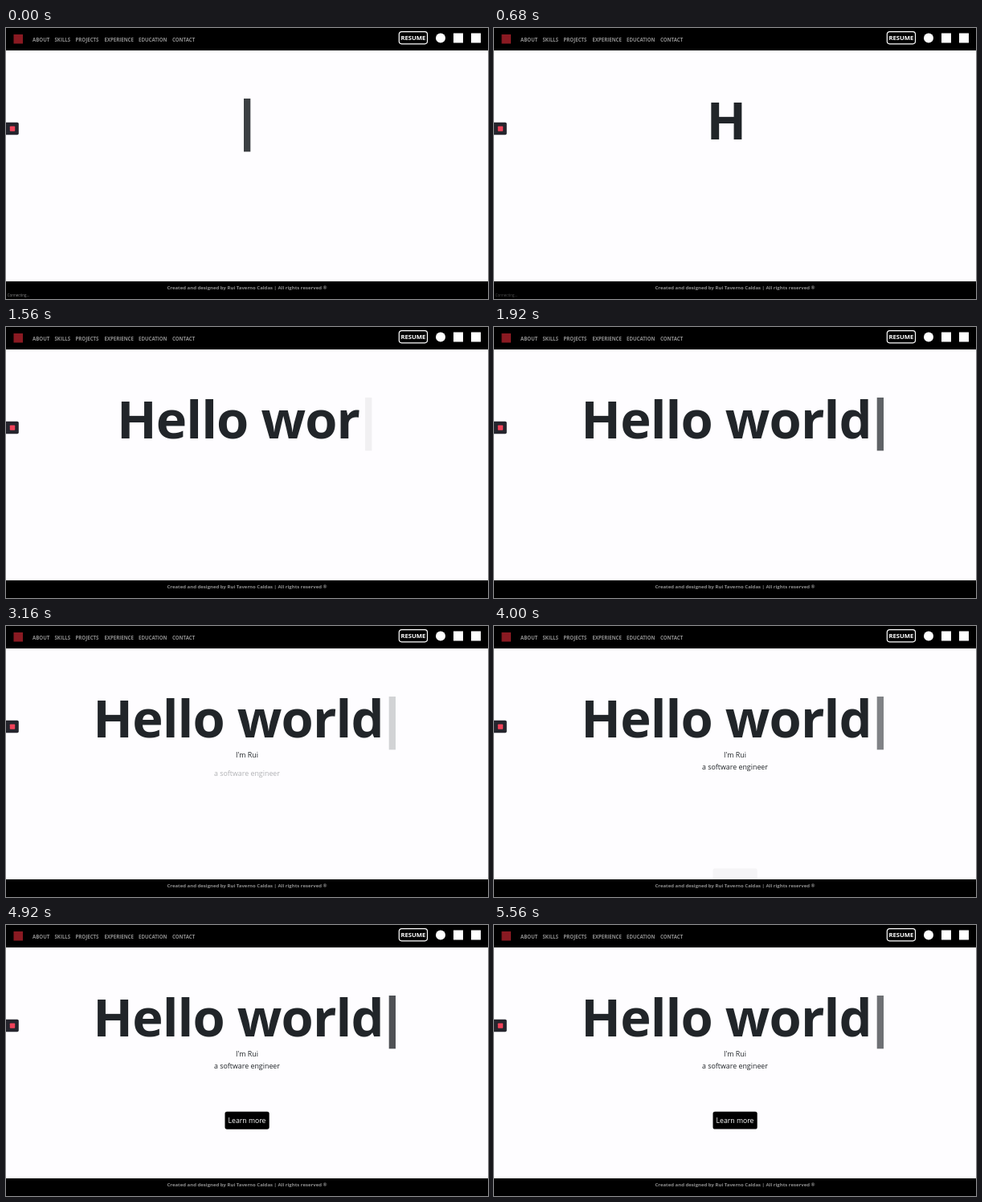
Write an HTML page with a canvas that moves like this. It is 600x338 px and loops after 5.6 s.

```html
<!DOCTYPE html>
<html lang="en">
<head>
<meta charset="utf-8">
<title>Portfolio intro</title>
<style>
  html, body { margin: 0; width: 100%; height: 100%; overflow: hidden; background: #fefdff; }
  canvas { display: block; width: 600px; height: 338px; }
</style>
</head>
<body>
<canvas id="stage"></canvas>
<script>
const W = 600, H = 338, LOOP = 5600;
const PAPER = '#fefdff', INK = '#212529', MUTED = '#8e8e8e';
const FAMILY = '"Open Sans", "Noto Sans", sans-serif';
const TITLE = 'Hello world', TYPE_START = 600, TYPE_STEP = 120;

const NAV = [['ABOUT', 33], ['SKILLS', 60.5], ['PROJECTS', 86.5],
  ['EXPERIENCE', 122.5], ['EDUCATION', 165], ['CONTACT', 207]];

// Page clock in seconds against loop time, with a short stall and a skip
const CLOCK = [[0, .29], [1920, 2.21], [2360, 2.65], [2479, 2.65], [2480, 3.07],
  [3160, 3.75], [4000, 4.63], [4400, 5.085], [5600, 6.225]];

const canvas = document.getElementById('stage');
const ctx = canvas.getContext('2d');
const ratio = window.devicePixelRatio || 1;
canvas.width = W * ratio;
canvas.height = H * ratio;

const clamp = v => Math.min(1, Math.max(0, v));

function clock(t) {
  let i = 1;
  while (i < CLOCK.length - 1 && t >= CLOCK[i][0]) i++;
  const [t0, a] = CLOCK[i - 1], [t1, b] = CLOCK[i];
  return a + (b - a) * (t - t0) / (t1 - t0);
}

// cubic-bezier(.25, .1, .25, 1)
function ease(x) {
  x = clamp(x);
  if (x === 0 || x === 1) return x;
  const curve = (s, p, q) => 3 * s * (1 - s) * ((1 - s) * p + s * q) + s * s * s;
  let lo = 0, hi = 1;
  for (let i = 0; i < 24; i++) {
    const mid = (lo + hi) / 2;
    if (curve(mid, .25, .25) < x) lo = mid; else hi = mid;
  }
  return curve(lo, .1, 1);
}

function blink(seconds) {
  const u = seconds % 1;
  return u < .5 ? ease(u * 2) : 1 - ease(u * 2 - 1);
}

function text(str, x, y, size, color, weight = 400, align = 'left') {
  ctx.font = `${weight} ${size}px ${FAMILY}`;
  ctx.textAlign = align;
  ctx.fillStyle = color;
  ctx.fillText(str, x, y);
}

function rect(x, y, w, h, color) {
  ctx.fillStyle = color;
  ctx.fillRect(x, y, w, h);
}

function rounded(x, y, w, h, r) {
  ctx.beginPath();
  ctx.roundRect(x, y, w, h, r);
}

function fillRounded(x, y, w, h, r, color) {
  rounded(x, y, w, h, r);
  ctx.fillStyle = color;
  ctx.fill();
}

function fadeUp(progress, distance, paint) {
  if (progress <= 0) return;
  const e = ease(progress);
  ctx.save();
  ctx.globalAlpha = e;
  ctx.translate(0, distance * (1 - e));
  paint();
  ctx.restore();
}

function drawTitle(t) {
  const count = t < TYPE_START ? 0 : Math.floor((t - TYPE_START) / TYPE_STEP) + 1;
  const typed = TITLE.slice(0, count);
  ctx.save();
  ctx.letterSpacing = '-0.9px';
  ctx.font = `700 65px ${FAMILY}`;
  const width = typed ? ctx.measureText(typed).width : 0;
  text(typed, 289 - width / 2, 138.5, 65, INK, 700);
  ctx.globalAlpha = blink(clock(t));
  rect(296 + width / 2, 88, 8.3, 66.3, INK);
  ctx.restore();
}

function drawButton() {
  fillRounded(272.5, 232.8, 55.2, 21.8, 2.6, '#000');
  text('Learn more', 300, 247, 8.7, '#fff', 400, 'center');
}

function drawHeader() {
  rect(0, 0, W, 28, '#000');
  rect(9.5, 8, 11.5, 11.5, '#8a1a22');
  for (const [label, x] of NAV) text(label, x, 16.8, 6.1, MUTED, 700);

  rounded(489.3, 4.6, 35.2, 15.2, 3.2);
  ctx.strokeStyle = '#fff';
  ctx.lineWidth = 1.2;
  ctx.stroke();
  text('RESUME', 506.9, 15.2, 7.7, '#fff', 700, 'center');

  ctx.beginPath();
  ctx.arc(541, 12.4, 6, 0, Math.PI * 2);
  ctx.fillStyle = '#fff';
  ctx.fill();
  rect(557, 6.5, 12, 12, '#fff');
  rect(579, 6.5, 12, 12, '#fff');
}

function drawFooter(t) {
  rect(0, 316, W, 22, '#000');
  text('Created and designed by Rui Taverno Caldas | All rights reserved ®',
    300, 326.4, 6, MUTED, 700, 'center');
  ctx.save();
  ctx.globalAlpha = 1 - clamp((t - 620) / 140);
  text('Connecting...', 1.7, 335.4, 4.5, '#8a8a8a');
  ctx.restore();
}

function drawRecorder() {
  fillRounded(-3, 117.8, 18.8, 15.4, 1.8, '#25252d');
  fillRounded(4.8, 122.4, 6.4, 6.4, .8, '#f0435a');
}

function draw(t) {
  ctx.setTransform(ratio, 0, 0, ratio, 0, 0);
  rect(0, 0, W, H, PAPER);
  drawTitle(t);
  fadeUp(clock(t) - 2.55, 13.5, () => text("I'm Rui", 300, 164.2, 8.85, INK, 400, 'center'));
  fadeUp((t - 2940) / 1000, 13.5,
    () => text('a software engineer', 300, 178.5, 8.85, INK, 400, 'center'));
  fadeUp((t - 3950) / 1000, 72, drawButton);
  drawHeader();
  drawFooter(t);
  drawRecorder();
}

const start = performance.now();
function tick() {
  draw((performance.now() - start) % LOOP);
  requestAnimationFrame(tick);
}
tick();
</script>
</body>
</html>
```
